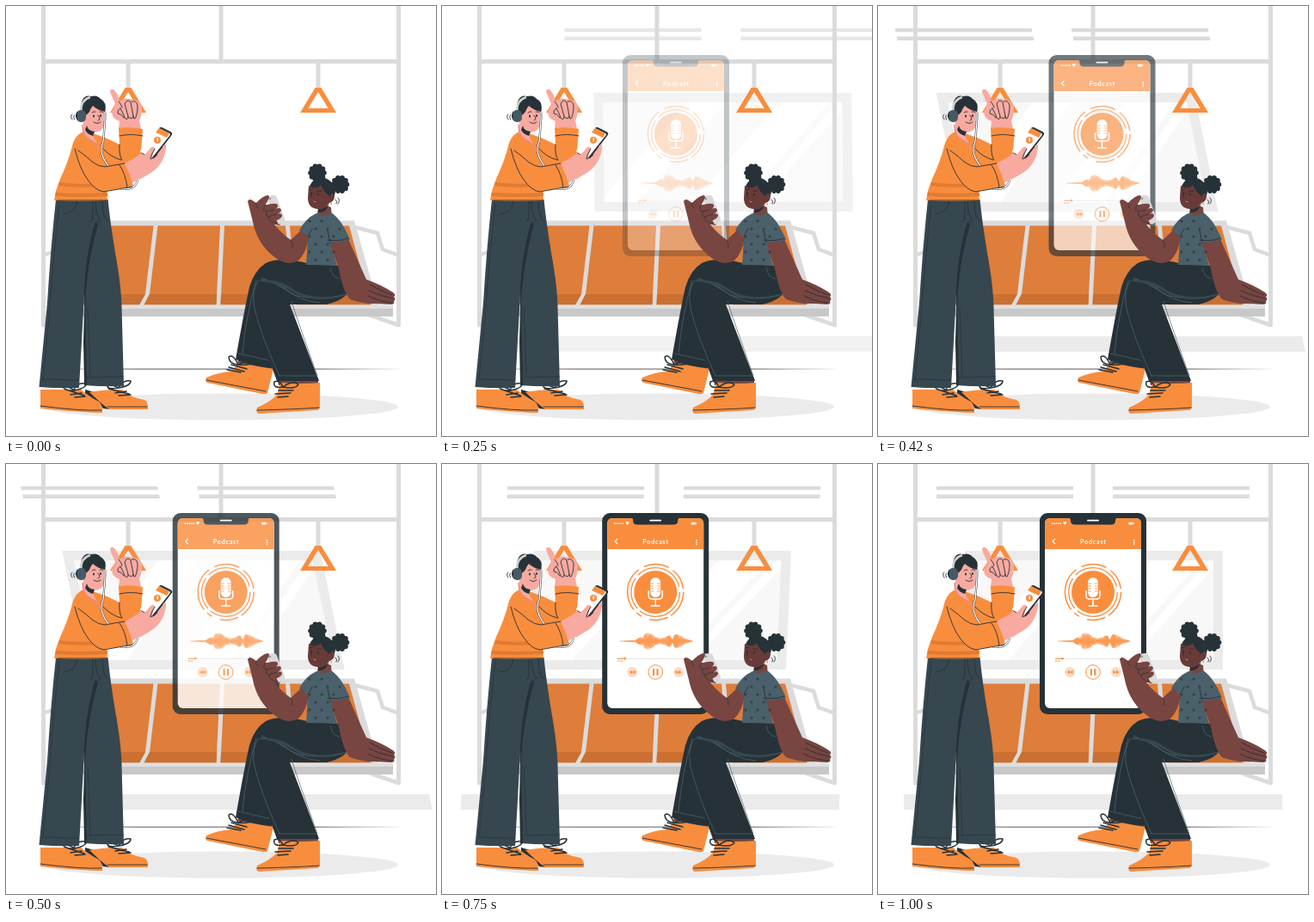
Recreate the animation shown at these times as an HTML page. Size 500 by 500 pixels, loop 1.04 s.

```html
<!DOCTYPE html>
<html lang="en">
<head>
<meta charset="utf-8">
<title>Podcast on the train</title>
<style>
html, body { margin: 0; width: 100%; height: 100%; overflow: hidden; background: #fff; }
svg { display: block; width: 100vw; height: 100vh; }
.o { fill: #f98d3e; }
.d { fill: #263238; }
.g { fill: #dbdbdb; }
.l { fill: #ebebeb; }
.w { fill: #fff; }
.skin { fill: #f8aaa1; }
.brown { fill: #784541; }
.deep { fill: #683a38; }
.line { fill: none; stroke: #263238; stroke-width: .9; stroke-linecap: round; stroke-linejoin: round; }
.lace { stroke-width: 1.5; }
.stitch { fill: none; stroke: #506771; stroke-width: .7; }
.seam { fill: none; stroke: #263238; stroke-width: .7; }
.rail { fill: none; stroke: #dbdbdb; stroke-width: 5; stroke-linejoin: round; }
.ring { fill: none; stroke: #f98d3e; }
text { font: 700 7.2px Lato, "Open Sans", sans-serif; letter-spacing: .75px; fill: #fff; }
</style>
</head>
<body>
<svg viewBox="0 0 500 500">
  <defs>
    <g id="strap">
      <path class="g" d="M-2.500 66h5v31h-5z"/>
      <path class="o" fill-rule="evenodd" d="M-3.500 95H3.500L21 124H-21ZM0 100L-11.700 119H11.700Z"/>
    </g>
    <path id="skip" d="M-3.600 0L0 -2.300V2.300ZM0 0L3.600 -2.300V2.300Z"/>
    <path id="cable" fill="none" d="M115 133Q114 148 113 158Q107 170 119 186M153 202Q150 216 132 212"/>
  </defs>

  <g id="scenery">
    <path class="g" d="M68 26h159v4.300H68zM68 35.500h159v4.500H68zM273 26h159v4.300H273zM273 35.500h159v4.500H273z"/>
    <path class="l" d="M30 384h440v18H30z"/>
    <path fill="#f8f8f8" d="M101 101h300v138H101z"/>
    <path class="w" d="M210 112h45l-104 116h-39v-7zM318 112h58L272 228h-58zM385 112h5v9l-96 107h-13z"/>
    <path class="l" fill-rule="evenodd" d="M101 101h300v138H101zM112 112v116h278V112z"/>
  </g>

  <path class="rail" d="M43.500 0V371L90 355M456.500 0V371L410 355M250 0V64M41 64.500H459"/>
  <path class="rail" style="stroke-width:4.500" d="M43 290L62 283L68 264L95 258M457 290L438 283L432 264L405 257"/>
  <use href="#strap" x="142"/>
  <use href="#strap" x="363"/>

  <g id="bench">
    <path class="g" d="M92 249.500H405L433 349H70Z"/>
    <path fill="#df7d3a" d="M97 255.500H171.500L162 335L155 347.500H80ZM176.500 255.500H249L244.500 347.500H160.500L167 335ZM254 255.500H325L333 347.500H249.500ZM330 255.500H399L424 347.500H338Z"/>
    <path fill="#cb7032" d="M82 335H162L155 347.500H78ZM167 335H245.200L244.500 347.500H160.500ZM250 335H332L333 347.500H249.500ZM336 335H421L424 347.500H338Z"/>
    <path fill="#e0e0e0" d="M60 347.500H450V351.500H60z"/>
    <path fill="#c8c8c8" d="M60 351.500H450V361H60z"/>
  </g>
  <path fill="#807a7e" d="M30 422L150 421.400H360L465 422L360 422.700H150Z"/>
  <ellipse class="l" cx="250" cy="466" rx="206" ry="15.500"/>

  <g id="phone">
    <rect class="d" x="188" y="57" width="124" height="234" rx="9"/>
    <rect class="w" x="194" y="63" width="112" height="221" rx="6"/>
    <path class="o" d="M194 99V69q0-6 6-6H300q6 0 6 6V99Z"/>
    <path class="d" d="M220 62q4 0 4 4q0 4.500 5 4.500H271q5 0 5-4.500q0-4 4-4Z"/>
    <rect class="w" x="243" y="64.700" width="14" height="1.800" rx=".9"/>
    <path d="M202 69.200H213" stroke="#fff" stroke-width="1.600" stroke-dasharray="1.500 .9"/>
    <path class="w" d="M215 68q2.300-1.800 4.600 0L217.300 71zM291.500 67.700h5v2.700h-5zM297 68.300h1v1.500h-1z"/>
    <path d="M206 87L203 90L206 93" fill="none" stroke="#fff" stroke-width="1.100"/>
    <text x="250.400" y="93.300" text-anchor="middle">Podcast</text>
    <path class="w" d="M297 88h1.500v1.500H297zM297 90.400h1.500v1.500H297zM297 92.800h1.500v1.500H297z"/>
    <circle class="o" cx="250" cy="149" r="25"/>
    <circle class="ring" cx="250" cy="149" r="28.300" stroke-width="1.300" stroke-dasharray="64 4 38 5 60 7"/>
    <circle class="ring" cx="250" cy="149" r="32.500" stroke-width="1.500" stroke-dasharray="32 4 22 10 7 5 52 7 30 6 25 4"/>
    <rect class="w" x="244" y="132" width="12" height="23" rx="6"/>
    <path stroke="#f98d3e" stroke-width=".8" d="M244 139h4M244 142h4M244 145h4M244 148h4M252 139h4M252 142h4M252 145h4M252 148h4"/>
    <path fill="none" stroke="#fff" stroke-width="1.500" d="M242 147V153q0 4 4 4h8q4 0 4-4V147M250 157V165M244.500 165H255.500"/>
    <g id="waves" class="o"></g>
    <path d="M206 226.300H290" stroke="#dedede" stroke-width=".8"/>
    <path d="M206 226.300H215M206 229h2.500M209.300 229h2.500" stroke="#f98d3e"/>
    <circle class="o" cx="214.500" cy="226.300" r="1.300"/>
    <g fill="#fcdcc5"><circle cx="223" cy="242" r="6"/><circle cx="277" cy="242" r="6"/></g>
    <use href="#skip" class="o" x="223" y="242"/>
    <use href="#skip" class="o" transform="translate(277 242) scale(-1 1)"/>
    <circle class="ring" cx="250" cy="242" r="8.300"/>
    <path class="o" d="M246.800 238.200h2.200v7.600h-2.200zM251.200 238.200h2.200v7.600h-2.200z"/>
  </g>

  <g id="man">
    <!-- shoes -->
    <path class="d" d="M92 446L106 450L121 469L113 468Q108 460 92 451Z"/>
    <path class="o" d="M40 446H87Q98 455 108 460Q113 464 112 473Q92 473 40 468ZM97 449Q112 446 135 446Q143 455 161 458Q166 461 165 469H120Q110 462 97 449Z"/>
    <path class="line" d="M40 465Q85 471 111 470M118 466H164"/>
    <path class="line lace" d="M70 446L91 453M75 452L88 450M80 455L92 454M79 447Q82 437 93 439Q94 444 80 447Q68 440 67 444Q70 448 80 447M119 445L143 451M127 450L140 448M131 453L145 452M131 444Q136 434 145 436Q145 442 131 444Q119 438 118 443Q121 446 131 444"/>
    <!-- trousers -->
    <path fill="#37474f" d="M58 225H118.500Q121 250 127 287Q134 325 134.500 350L137 442Q115 443 91 441L91 335L85 444Q62 445 38.500 443L48 345Q52 280 58 225Z"/>
    <path class="d" d="M104 251Q95 280 92 315L90 390L91 441L94 441L92 345Q94 300 107 254Z"/>
    <path class="line" d="M67 242Q82 241 83 226M104 226Q104 244 110 249Q107 253 103 255Q94 290 91 335M101 227V245Q101 250 98 251M119 250Q112 247 112 228"/>
    <path class="seam" d="M62 229Q54 300 51 350L43 434M40 434L85 435M91 432L137 431M95 350Q97 390 98 431"/>
    <!-- raised arm -->
    <path class="skin" d="M121 100Q121 96 125 97Q130 101 132 111Q140 105 147 109Q156 109 158 117Q158 128 155 133L157 143H131L132 134Q123 131 123 123Q126 118 127 114Z"/>
    <path class="line" d="M131 111Q134 114 135 118M133 119Q136 124 138 130Q142 134 142 128L138 114Q141 107 145 112L148 128Q147 133 142 129M146 111Q152 109 153 116Q153 126 150 131Q148 132 148 128M133 119Q129 121 130 125Q134 125 137 130"/>
    <path class="o" d="M101 148Q117 153 132 161L131 142Q145 140 159 143L157 170Q155 181 142 184L117 187L98 176Z"/>
    <path class="line" d="M132 151Q145 148 159 151M132 161Q131 174 135 179"/>
    <!-- body -->
    <path class="o" d="M90 146Q82 149 78 159Q73 180 63 201L58 215L56 226Q87 228 118 226L117 213L119 186L126 181L106 151Z"/>
    <path fill="#e07b32" d="M62 205Q85 208 117 206V210Q85 212 61 209ZM58 217Q86 219 118 217V221Q86 223 57 221Z"/>
    <!-- face -->
    <path class="skin" d="M91 118Q104 111 116 120Q118 137 111 144Q106 148 100 146Q101 153 106 159Q95 158 89 146Z"/>
    <path class="d" d="M94 139Q95 145 103 146L101 151Q94 149 92 144Z"/>
    <path class="d" d="M91 127Q85 115 89 109Q92 103 99 105Q106 103 110 108Q118 112 115 123Q106 121 101 116Q98 119 97 123Q94 127 91 128Z"/>
    <path fill="none" stroke="#d0d0d0" stroke-width="2.500" d="M87 123Q87 109 98 106"/>
    <rect x="82" y="121" width="11" height="14" rx="5" fill="#455a64"/>
    <path class="d" d="M83 122q-4 6 0 11z"/>
    <rect x="114" y="123" width="3" height="10" rx="1.500" fill="#bdbdbd"/>
    <path class="line" d="M100 124Q102 122 104 123M109 123Q112 122 113 124M107 127Q111 132 107 133M102 135Q106 138 110 135M77 126Q74 128 77 132M79.500 127Q77.500 129 79.500 132"/>
    <ellipse class="d" cx="102" cy="128" rx="1" ry="1.600"/>
    <ellipse class="d" cx="110" cy="127.500" rx="1" ry="1.600"/>
    <path fill="none" stroke="#e98b83" stroke-width="1.500" d="M89 138Q89 151 97 155Q104 159 109 166"/>
    <use href="#cable" stroke="#263238" stroke-width="2.200"/>
    <use href="#cable" stroke="#fff" stroke-width="1.300"/>
    <!-- phone and front arm -->
    <path class="skin" d="M135 184Q151 177 157 171L169 164Q179 158 183 158Q189 163 181 177Q174 190 163 196L145 207Z"/>
    <path class="d" d="M178 142Q180 140 183 142L191 146Q195 148 192 151L173 176Q171 179 168 177L157 171Z"/>
    <path class="w" d="M178 142L190 148Q192 149 190 151L171 175Q169 177 167 176L157 170Q155 169 157 167Z"/>
    <path class="o" d="M178 142L190 148L187 153L174 147Z"/>
    <circle class="o" cx="176" cy="156" r="4"/>
    <path class="w" d="M175.500 153.500h1.500v4h-1.500z"/>
    <path class="skin" d="M152 178Q162 174 168 165Q172 162 173 166Q169 175 171 178Q180 172 183 162Q186 159 186 165Q184 183 170 193L155 202Z"/>
    <path class="line" d="M173 166Q169 172 168 177M176 173Q172 177 168 178"/>
    <path class="o" d="M80 165Q91 171 113 187L138 183Q144 195 148 209Q131 214 113 216Q101 214 94 200Z"/>
    <path class="line" d="M80 166Q86 190 95 202Q104 215 114 216L147 210M84 168Q95 176 100 181Q108 187 115 187L138 183M132 185Q139 195 141 211M60 226H118M113 166Q122 176 134 179"/>
  </g>

  <g id="woman">
    <!-- shoes -->
    <path class="brown" d="M270 408L310 417L309 425L269 420ZM315 431L363 432V441H317Z"/>
    <path class="o" d="M270 415L311 422L304 450Q302 452 298 451L234 438Q231 436 233 432Q246 426 262 425ZM319 438Q344 440 365 438V466Q365 470 360 470L294 474Q290 473 292 467Q308 460 315 452Z"/>
    <path class="line" d="M233 435L302 448M292 470Q336 469 364 467"/>
    <path class="line lace" d="M259 420L277 425M257 423L273 426M262 417L280 422M270 417Q259 416 259 408Q264 404 270 417Q285 418 288 414Q282 411 270 417M313 451L331 450M317 447L334 447M316 455L328 454M322 443Q310 445 312 437Q318 434 322 443Q337 446 340 440Q333 435 322 443"/>
    <!-- trousers -->
    <path class="d" d="M350 299Q318 291 302 299Q289 307 283 327Q277 354 267 411Q290 420 309 421L330 347H372Q401 341 399 323L389 302Z"/>
    <path class="d" d="M385 303Q350 306 314 306Q287 316 284 333Q288 362 315 436H364L330 347H372Q398 340 399 325Z"/>
    <path class="stitch" d="M297 316Q314 322 332 334Q352 345 397 335M294 319Q285 330 289 352Q297 385 318 430M332 343L337 359L362 430M317 430H361M291 319Q279 360 275 404M270 404L306 412M377 304Q379 316 388 317M365 345Q341 343 325 329Q312 320 296 318"/>
    <path fill="#37474f" d="M291 320Q316 315 335 330Q355 343 397 336Q365 346 340 336Q315 320 291 320Z"/>
    <!-- resting arm -->
    <path class="brown" d="M376 275L398 271Q410 298 419 318Q436 324 450 333Q454 336 451 338Q454 341 451 343Q453 347 447 347L428 346Q417 347 400 341Q392 333 387 305Z"/>
    <path class="line" d="M423 324Q437 332 449 336M422 331Q437 338 450 340M421 337Q434 344 449 345"/>
    <!-- shirt -->
    <path class="brown" d="M364 229L378 234L379 247L361 247Z"/>
    <path fill="#4a606a" d="M361 241Q371 246 378 240Q391 249 400 272Q390 275 377 275L385 302Q367 301 349 301L351 268L341 261Q348 247 361 241Z"/>
    <g id="dots" class="d" opacity=".65"></g>
    <path class="line" d="M377 275L374 261M351 268L356 259M374 272Q389 274 398 270"/>
    <!-- head -->
    <g id="puffs" class="d"></g>
    <path class="d" d="M352 213Q355 200 368 199Q382 203 383 216Q381 229 373 227Z"/>
    <path class="deep" d="M352 209Q361 214 366 208Q370 217 376 221Q380 215 382 220Q382 228 376 229Q371 237 362 236Q351 235 351 223Z"/>
    <path class="d" d="M363 236Q371 237 376 230Q372 241 363 240Z"/>
    <path class="line" d="M353 214L357 213M362 215L367 215M356 218Q353 222 356 223M383 225Q386 227 384 230M386 223Q389 226 386 230"/>
    <ellipse class="d" cx="355" cy="218" rx="1" ry="1.500"/>
    <ellipse class="d" cx="363" cy="219" rx="1" ry="1.500"/>
    <path class="w" d="M357 226Q359 228 361 227Q359 229 357 226Z"/>
    <circle class="o" cx="378" cy="230" r="1"/>
    <!-- arm with phone -->
    <path class="deep" d="M300 231L315 231L323 246L318 255L302 252Z"/>
    <path fill="#d9d9d9" d="M300 224Q300 221 303 221L311 220Q314 220 315 223L324 247Q324 253 317 254Z"/>
    <path class="w" d="M300 224Q300 221 303 221L313 252Z" opacity=".6"/>
    <circle cx="307" cy="224" r="1.200" fill="#999"/>
    <path class="brown" d="M281 227Q283 223 288 227L291 229Q297 222 304 220Q308 221 304 227L301 232Q313 228 316 231Q317 235 311 237Q319 233 320 237Q320 240 315 242Q321 240 321 244Q320 248 310 251Q316 261 331 272L343 261L352 269Q349 288 340 296Q327 304 311 291Q292 276 287 251Z"/>
    <path class="line" style="stroke-width:.7" d="M301 232Q298 237 302 239L311 237M303 239Q301 244 305 245L315 242M306 245Q305 249 310 251M291 229Q290 233 293 235M331 272Q334 276 333 281"/>
  </g>
</svg>
<script>
const LOOP = 1040, FPS = 24;
const $ = id => document.getElementById(id);
const circle = (x, y, r) => `<circle cx="${x}" cy="${y}" r="${r}"/>`;

// Overlapping translucent swells form the sound wave.
function wavePath(k) {
  const top = [], bottom = [];
  for (let x = 0; x <= 86; x++) {
    const swell = 8 * Math.exp(-(((x - 34) / 9) ** 2)) + 7 * Math.exp(-(((x - 66) / 13) ** 2)) + 2 * Math.sin(Math.PI * x / 86);
    const h = swell * (.15 + .85 * Math.abs(Math.sin(x * (.2 + k * .08) + k * 1.3)));
    top.push(`${207 + x} ${206 - h}`);
    bottom.unshift(`${207 + x} ${206 + h}`);
  }
  return `<path opacity=".42" d="M${top.concat(bottom).join("L")}Z"/>`;
}
$("waves").innerHTML = [0, 1, 2, 3].map(wavePath).join("");

let dots = "";
for (let row = 0; row < 6; row++)
  for (let x = 353 + row % 2 * 7; x < (row < 3 ? 392 : 383); x += 14)
    if (row || x < 380) dots += circle(x, 250 + row * 9, 1.6);
$("dots").innerHTML = dots;

// A curly bun: a disc with small bumps around its rim.
function puff(x, y) {
  let bun = circle(x, y, 9.5);
  for (let a = 0; a < 6.2; a += Math.PI / 5)
    bun += circle(x + 8 * Math.cos(a), y + 8 * Math.sin(a), 2.8);
  return bun;
}
$("puffs").innerHTML = puff(362, 194) + puff(388.5, 207.5);

const bezier = (a, b, s) => 3 * (1 - s) ** 2 * s * a + 3 * (1 - s) * s * s * b + s ** 3;

function ease(x) {
  if (x <= 0) return 0;
  if (x >= 1) return 1;
  let lo = 0, hi = 1;
  for (let i = 0; i < 30; i++) {
    const mid = (lo + hi) / 2;
    if (bezier(.36, .5, mid) < x) lo = mid; else hi = mid;
  }
  return bezier(-.01, 1.38, lo);
}

const mix = (a, b, p) => a + (b - a) * p;

function place(id, transform, opacity) {
  $(id).setAttribute("transform", transform);
  $(id).setAttribute("opacity", Math.min(1, Math.max(0, opacity)));
}

function draw(t) {
  const p = ease(t);
  place("phone", `translate(${30 * (1 - p)})`, p);

  // The scenery rushes in, leaning one way and then the other.
  const enter = ease(t / .6);
  const lean = t < .6 ? mix(-17, 10, enter)
    : t < .8 ? mix(10, -2, ease((t - .6) / .2))
    : mix(-2, 0, ease((t - .8) / .2));
  const k = Math.tan(lean * Math.PI / 180);
  place("scenery", `matrix(1 0 ${k} 1 ${220 * (1 - enter) - 214 * k} 0)`, enter);
}

function tick() {
  const ms = performance.now() % LOOP;
  const t = Math.min(FPS, Math.floor((ms + 4) * FPS / 1000)) / FPS;
  draw(Math.min(1, t + Math.min(.036, .09 * t)));
  requestAnimationFrame(tick);
}
tick();
</script>
</body>
</html>
```
